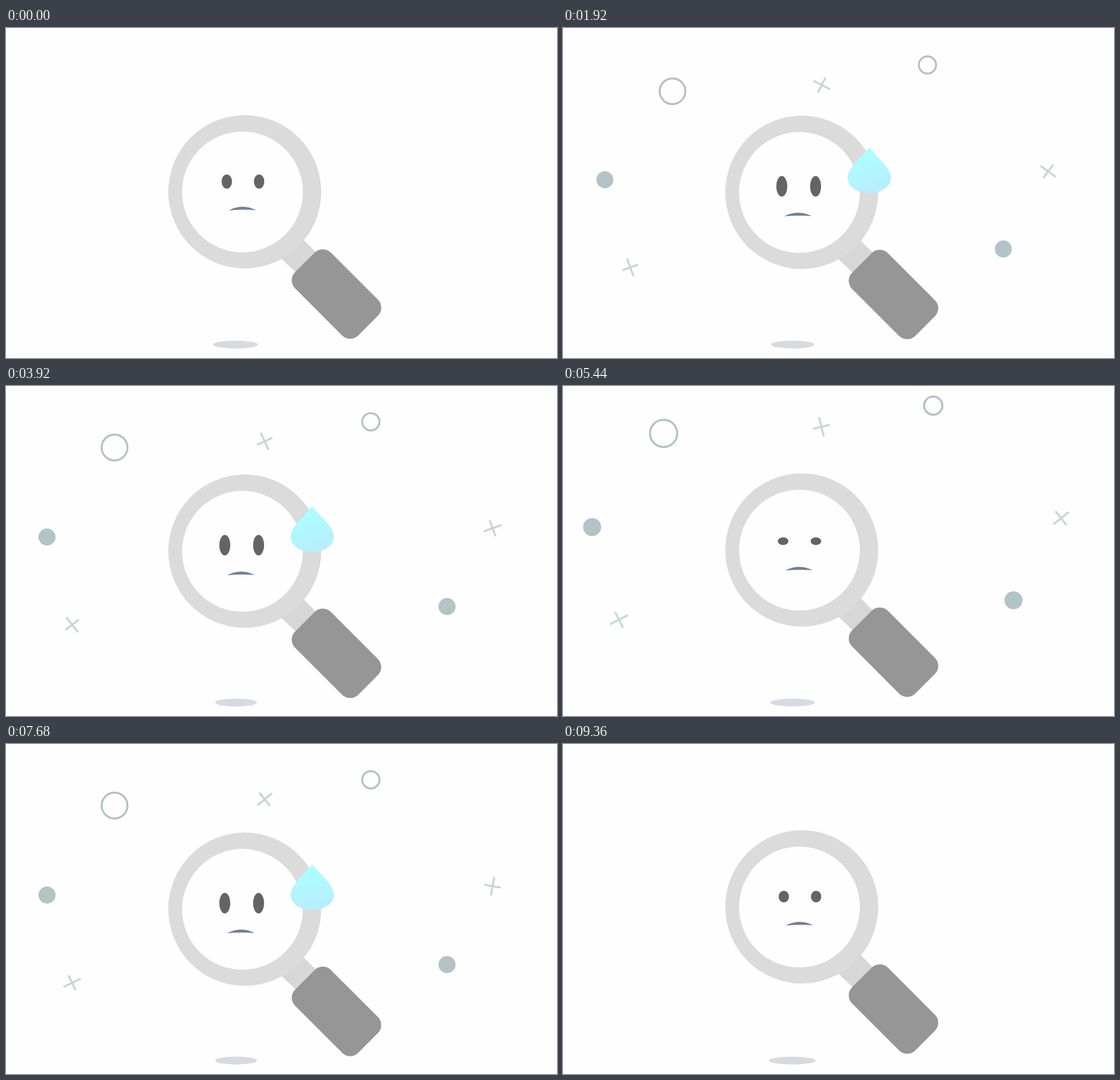
An HTML page with a canvas for the animation above (9.44 s loop, 967 by 579 pixels).

```html
<!DOCTYPE html>
<html>
<head>
<meta charset="utf-8">
<title>Nothing found</title>
<style>
  html, body { margin: 0; width: 100%; height: 100%; overflow: hidden; background: #fefefe; }
  canvas { display: block; }
</style>
</head>
<body>
<canvas id="stage" width="967" height="579"></canvas>
<script>
const ctx = document.getElementById('stage').getContext('2d');
const CYCLE = 4720, STEP = 80, TAU = Math.PI * 2;
const BURST = { x: 463, y: 592 };

const mix = (a, b, k) => a + (b - a) * k;
const mixColor = (a, b, k) => `rgb(${a.map((v, i) => Math.round(mix(v, b[i], k)))})`;
const clamp = v => Math.min(1, Math.max(0, v));
const ramp = (t, start, duration) => clamp((t - start) / duration);
const ease = (t, start, duration) => (1 - Math.cos(Math.PI * ramp(t, start, duration))) / 2;

// Pops past full size, sinks a little below it, settles, then shrinks away.
const burstScale = (t, peak, dip) =>
  (1 + peak) * ease(t, 80, 360) - (peak + dip) * ease(t, 440, 840) +
  dip * ease(t, 1280, 780) - ease(t, 4240, 200);

// Eyes shut quickly just before the given moment and open slowly after it.
function openness(t, shutAt) {
  const d = (t - shutAt + 1.5 * CYCLE) % CYCLE - CYCLE / 2;
  return clamp(d < 0 ? -d / 160 : d / 630);
}

function ellipse(x, y, rx, ry, color) {
  ctx.beginPath();
  ctx.ellipse(x, y, rx, ry, 0, 0, TAU);
  ctx.fillStyle = color;
  ctx.fill();
}

function fillPath(d, color) {
  ctx.fillStyle = color;
  ctx.fill(new Path2D(d));
}

function group(draw) {
  ctx.save();
  draw();
  ctx.restore();
}

function scaled(x, y, scale, draw) {
  if (scale < 0.001) return;
  group(() => {
    ctx.translate(x, y);
    ctx.scale(scale, scale);
    ctx.translate(-x, -y);
    draw();
  });
}

function ring(x, y, r, color) {
  ctx.strokeStyle = color;
  ctx.beginPath();
  ctx.arc(x, y, r, 0, TAU);
  ctx.stroke();
}

function cross(x, y, degrees, color) {
  group(() => {
    ctx.translate(x, y);
    ctx.rotate(degrees * Math.PI / 180);
    ctx.strokeStyle = color;
    ctx.beginPath();
    ctx.moveTo(-16.7, 0);
    ctx.lineTo(16.7, 0);
    ctx.moveTo(0, -14.8);
    ctx.lineTo(0, 14.8);
    ctx.stroke();
  });
}

function drawParticles(t) {
  const grey = ease(t, 720, 880), spin = t - 1920;
  const crossColor = mixColor([195, 218, 210], [200, 212, 212], grey);
  ctx.lineWidth = 3.4;
  scaled(BURST.x, BURST.y, burstScale(t, 0.095, 0.08), () => {
    ring(190.5, 108, 22.7, mixColor([171, 197, 188], [177, 193, 198], grey));
    cross(454, 97, 27 + spin * 0.109, crossColor);
    cross(116, 419, 70 + spin * 0.081, crossColor);
    cross(854, 249.5, 36 + spin * 0.062, crossColor);
  });
  scaled(BURST.x, BURST.y, burstScale(t, 0.088, 0.05), () => {
    ring(640.3, 62.8, 15.2, '#b1c1c6');
    ellipse(72, 265, 15, 15, '#b3c3c7');
    ellipse(774, 387, 15, 15, '#b3c3c7');
  });
}

function drawGlass() {
  fillPath('M510 360L550 400L515 435L474 396Z', '#d7d7d7');
  ellipse(419, 287.7, 134.2, 134.5, '#dbdbdb');
  ellipse(415, 288, 106, 106, '#fefefe');
  group(() => {
    ctx.translate(580, 467);
    ctx.rotate(Math.PI / 4);
    ctx.beginPath();
    ctx.roundRect(-78.4, -44.4, 156.8, 88.8, 20);
    ctx.fillStyle = '#969696';
    ctx.fill();
  });
}

function drawFace(t) {
  const worry = ramp(t, 500, 630) - ramp(t, 4120, 160);
  const eyeY = mix(269.7, 277.2, worry), rx = mix(9.1, 9.6, worry);
  const ry = 18 * openness(t, 484) * openness(t, 4283);
  ellipse(mix(387.5, 384, worry), eyeY, rx, ry, '#646464');
  ellipse(mix(444.2, 443.3, worry), eyeY, rx, ry, '#646464');
  group(() => {
    ctx.translate(mix(2.6, 0, worry), mix(-9.5, 0, worry));
    fillPath('M388 330Q412 317 436.5 329.5Q412 327.5 388 330Z', '#6f8296');
  });
}

function drawDrop(t) {
  scaled(537.5, 250, ease(t, 800, 320) - ease(t, 4240, 160), () => {
    const shade = ctx.createLinearGradient(525, 215, 550, 289);
    shade.addColorStop(0, '#aaffff');
    shade.addColorStop(1, '#b9ecff');
    fillPath('M537.5 209C547 222 575.5 245 575.5 262C575.5 279 558 289 537.5 289' +
             'C517 289 499.5 279 499.5 262C499.5 245 528 222 537.5 209Z', shade);
  });
}

function render(now) {
  const t = Math.floor(now / STEP) * STEP % CYCLE;
  const bob = 2.1 * Math.sin(TAU * t / 472 - 0.15);
  ctx.fillStyle = '#fefefe';
  ctx.fillRect(0, 0, 967, 579);
  drawParticles(t);
  ellipse(403 + 0.4 * bob, 555.4, 39 - 1.05 * bob, 7, '#d6dbe1');
  group(() => {
    ctx.translate(0, bob);
    drawGlass();
    drawFace(t);
    drawDrop(t);
  });
}

const start = performance.now();
function tick() {
  render(performance.now() - start);
  requestAnimationFrame(tick);
}
tick();
</script>
</body>
</html>
```
